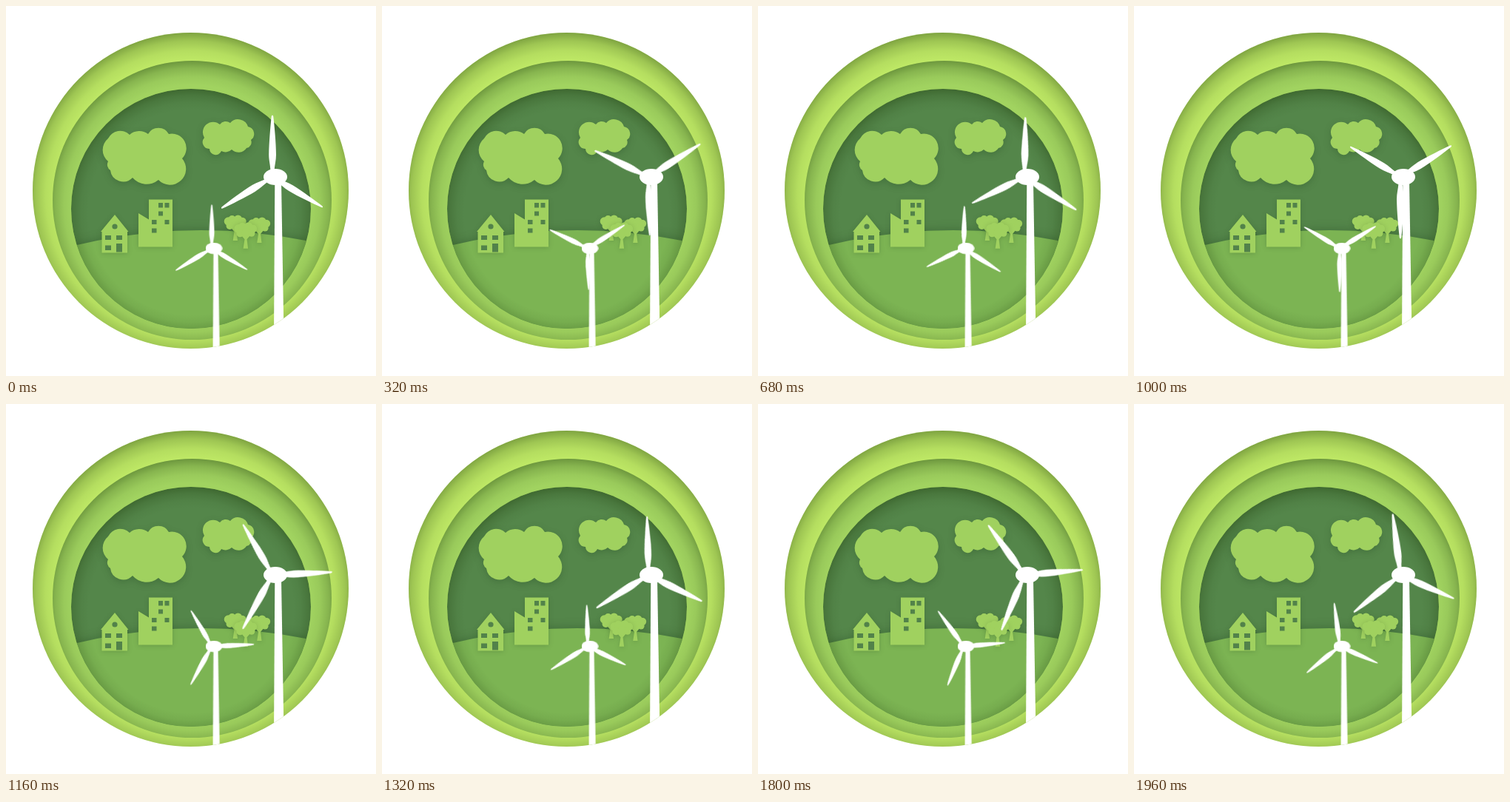
These frames come from a looping animation (500x500 px, 2000 ms). An HTML page:

```html
<!DOCTYPE html>
<html lang="en">
<head>
<meta charset="utf-8">
<title>Green energy</title>
<style>
  html, body { margin: 0; width: 100%; height: 100%; overflow: hidden; background: #fff; }
  svg { display: block; width: 100vw; height: 100vh; }
  .leaf { fill: #a0d15f; }
  .dark { fill: #52824a; }
  .cloud { filter: drop-shadow(0 3px 5px rgba(20, 50, 20, .22)); }
  .soft { filter: drop-shadow(0 1px 3px rgba(20, 50, 20, .2)); }
  .hill { fill: #7cb453; filter: drop-shadow(0 -2px 6px rgba(20, 50, 20, .25)); }
  .turbine { fill: #fff; }
  .spin { animation: spin 2s steps(50) infinite; }
  @keyframes spin { to { transform: rotate(360deg); } }
</style>
</head>
<body>
<svg viewBox="0 0 500 500">
  <defs>
    <!-- Inner shadow: fades in towards the rim, heaviest at the top -->
    <radialGradient id="shade" cx=".5" cy=".515" r=".515">
      <stop offset=".83" stop-color="#1e3c0a" stop-opacity="0"/>
      <stop offset=".89" stop-color="#1e3c0a" stop-opacity=".06"/>
      <stop offset=".95" stop-color="#1e3c0a" stop-opacity=".2"/>
      <stop offset="1" stop-color="#1e3c0a" stop-opacity=".4"/>
    </radialGradient>
    <clipPath id="rim"><circle cx="249.5" cy="249.5" r="213.5"/></clipPath>
    <clipPath id="view"><circle cx="250" cy="274" r="162"/></clipPath>

    <path id="blade" d="M-2.5-8C-3-18-5-23-4.8-31C-4.5-46-2.6-70-1.2-82Q0-85 1.2-82C2.6-70 5-46 5-30C5-22 3-16 2.5-8Z"/>
    <g id="blades">
      <use href="#blade"/>
      <use href="#blade" transform="rotate(121) scale(.95)"/>
      <use href="#blade" transform="rotate(238.5) scale(.97)"/>
    </g>
    <g id="mast">
      <path d="M3.3 6H12L15.5 215H2Z"/>
      <ellipse cx="4" rx="16" ry="11"/>
    </g>

    <g id="tree">
      <circle cx="-9" cy="-2" r="5.8"/>
      <circle cx="-4" cy="-5" r="5"/>
      <circle cx="4" cy="-5" r="5.5"/>
      <circle cx="10" cy="-2" r="5.2"/>
      <circle cx="-7" cy="4" r="5"/>
      <circle cx="1" cy="3" r="6"/>
      <circle cx="8" cy="4" r="4.6"/>
      <path d="M-6 6L-1 12L-2.8 24H3.5L2 12L7 6Z"/>
    </g>
  </defs>

  <circle cx="249.5" cy="249.5" r="213.5" fill="#bee865"/>
  <circle cx="249.5" cy="249.5" r="213.5" fill="url(#shade)"/>
  <circle cx="251.5" cy="262.5" r="188.5" fill="#a1d360"/>
  <circle cx="251.5" cy="262.5" r="188.5" fill="url(#shade)"/>

  <g clip-path="url(#view)">
    <circle cx="250" cy="274" r="162" fill="#54864a"/>
    <circle class="hill" cx="264" cy="1019" r="716"/>
  </g>
  <circle cx="250" cy="274" r="162" fill="url(#shade)"/>

  <path class="leaf cloud" d="M138 179A18 18 0 0 1 167 174A20 20 0 0 1 192 173A16 16 0 0 1 220 173A19.6 19.6 0 0 1 238 206A21.6 21.6 0 0 1 206 235A25 25 0 0 1 171 232A17.5 17.5 0 0 1 141 222A9 9 0 0 1 138 210A20 20 0 0 1 138 179Z"/>
  <path class="leaf cloud" d="M268 178A14 14 0 0 1 289 160A10 10 0 0 1 303 158A14 14 0 0 1 327 163A10 10 0 0 1 331 181A8 8 0 0 1 325 192A13 13 0 0 1 305 194A12 12 0 0 1 291 196A8.3 8.3 0 0 1 275 193A9 9 0 0 1 268 178Z"/>

  <g class="soft">
    <path class="leaf" d="M147 282L165.5 305H164V333.5H129.5V305H128Z"/>
    <path class="leaf" d="M179 280L193 288.5V261.5H225V325.5H179Z"/>
  </g>
  <circle class="dark" cx="147" cy="298" r="3.6"/>
  <path class="dark" d="M134 310h8v6h-8zM149 310h8v6h-8zM134 323.5h8v6.5h-8zM149 321h8v11.5h-8z"/>
  <path class="dark" d="M206 266h6v6.5h-6zM214.5 266h6v6.5h-6zM206 277.5h6v6h-6zM197 289h6.500v6h-6.500zM214.500 289h6v6h-6zM197 300.500h6.500v6h-6.500z"/>

  <g class="leaf">
    <use class="soft" href="#tree" x="309.500" y="293"/>
    <use class="soft" href="#tree" x="342" y="296"/>
    <use class="soft" href="#tree" transform="translate(323.500 303) scale(1.030)"/>
  </g>

  <g class="turbine" clip-path="url(#rim)">
    <g transform="translate(360 231)">
      <use href="#mast"/>
      <g class="spin"><use href="#blades"/></g>
    </g>
    <g transform="translate(278 327.500) scale(.708)">
      <use href="#mast"/>
      <g class="spin"><use href="#blades"/></g>
    </g>
  </g>
</svg>
</body>
</html>
```
